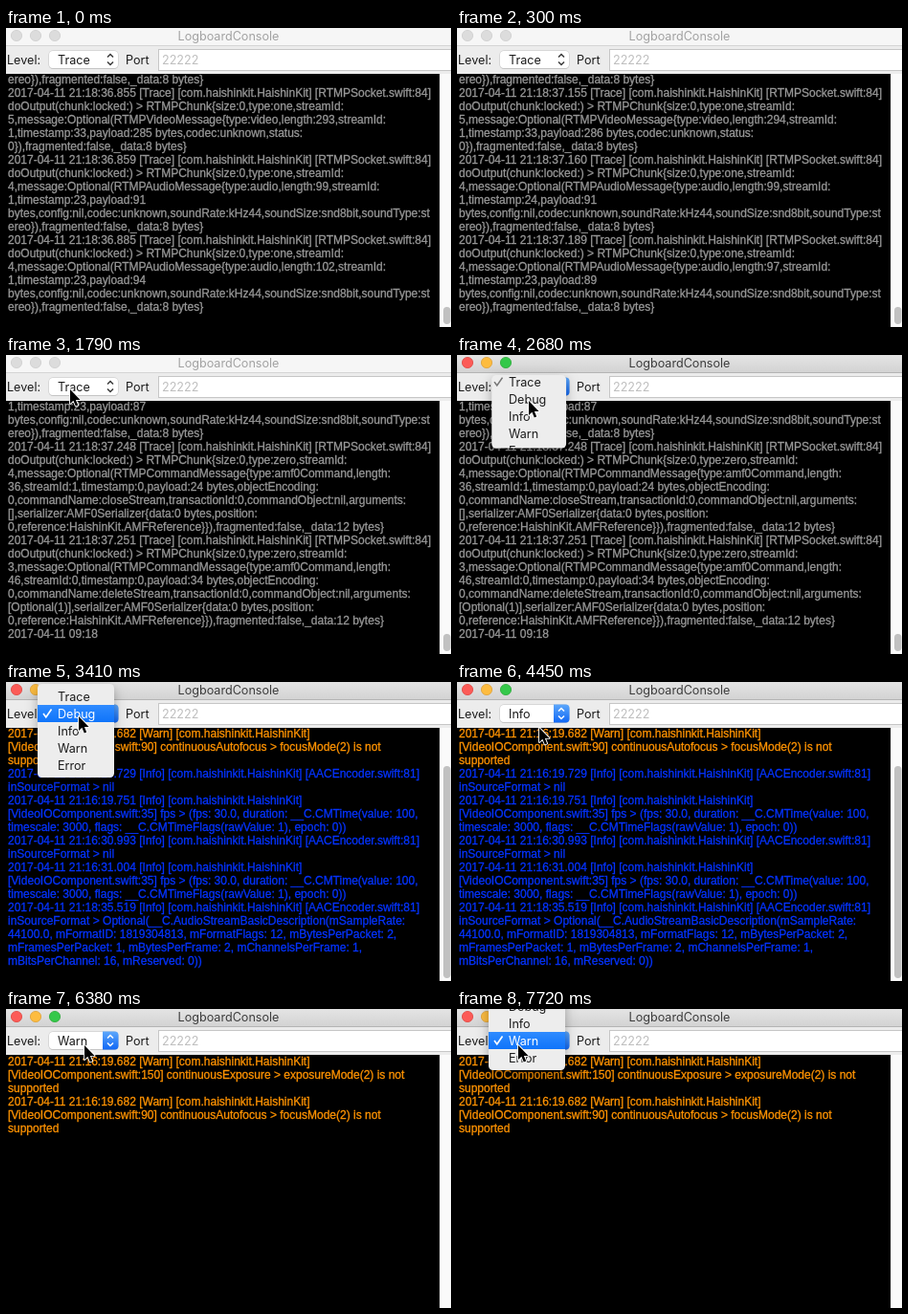
An HTML page with a canvas that plays this animation: 465 px wide and 313 px high, repeating every 8000 ms.

```html
<!DOCTYPE html>
<html lang="en">
<head>
<meta charset="utf-8">
<title>LogboardConsole</title>
<style>
  html, body { margin: 0; width: 100%; height: 100%; overflow: hidden; background: #000; }
  canvas { display: block; width: 465px; height: 313px; }
</style>
</head>
<body>
<canvas id="stage"></canvas>
<script>
const W = 465, H = 313, LOOP = 8000, TICK = 148.3;
const UI = '12.6px Inter, sans-serif';
const MONO = '12px "Liberation Sans", Arial, sans-serif';
const LEVELS = ['Trace', 'Debug', 'Info', 'Warn', 'Error'];
const ROW = 18, MID = 33;
const GRAY = '#989898', BLUE = '#0433ff', ORANGE = '#ff9300';

const canvas = document.getElementById('stage');
const ctx = canvas.getContext('2d');
const dpr = window.devicePixelRatio || 1;
canvas.width = W * dpr;
canvas.height = H * dpr;

// Log contents
const TAIL = 'ereo}),fragmented:false,_data:8 bytes}';
const head = (time, level, source) =>
  `2017-04-11 ${time} [${level}] [com.haishinkit.HaishinKit]` + (source ? ` [${source}]` : '');
const chunk = (time, type, id) => [
  head(time, 'Trace', 'RTMPSocket.swift:84'),
  `doOutput(chunk:locked:) > RTMPChunk{size:0,type:${type},streamId:`,
  id
];
const audioEnd = (stamp, payload) => [
  `1,timestamp:${stamp},payload:${payload}`,
  'bytes,config:nil,codec:unknown,soundRate:kHz44,soundSize:snd8bit,soundType:st',
  TAIL
];
const audio = (time, stamp, length) => [
  ...chunk(time, 'one', `4,message:Optional(RTMPAudioMessage{type:audio,length:${length},streamId:`),
  ...audioEnd(stamp, length - 8)
];
const video = (time, length) => [
  ...chunk(time, 'one', `5,message:Optional(RTMPVideoMessage{type:video,length:${length},streamId:`),
  `1,timestamp:33,payload:${length - 8} bytes,codec:unknown,status:`,
  '0}),fragmented:false,_data:8 bytes}'
];
const command = (time, id, length, stream, name, args) => [
  ...chunk(time, 'zero', `${id},message:Optional(RTMPCommandMessage{type:amf0Command,length:`),
  `${length},streamId:${stream},timestamp:0,payload:${length - 12} bytes,objectEncoding:`,
  `0,commandName:${name},transactionId:0,commandObject:nil,arguments:`,
  `[${args}],serializer:AMF0Serializer{data:0 bytes,position:`,
  '0,reference:HaishinKit.AMFReference}}),fragmented:false,_data:12 bytes}'
];
const warning = (line, what, mode) => [
  head('21:16:19.682', 'Warn'),
  `[VideoIOComponent.swift:${line}] ${what} > ${mode}(2) is not`,
  'supported'
];
const encoder = (time, format) => [
  head(time, 'Info', 'AACEncoder.swift:81'),
  'inSourceFormat > ' + format
];
const fps = time => [
  head(time, 'Info'),
  '[VideoIOComponent.swift:35] fps > (fps: 30.0, duration: __C.CMTime(value: 100,',
  'timescale: 3000, flags: __C.CMTimeFlags(rawValue: 1), epoch: 0))'
];
const paint = (color, lines) => lines.map(text => ({ text, color }));
const focus = warning(90, 'continuousAutofocus', 'focusMode');

const LOGS = {
  first: paint(GRAY, [TAIL, ...video('21:18:36.855', 293),
    ...audio('21:18:36.859', 23, 99), ...audio('21:18:36.885', 23, 102)]),
  second: paint(GRAY, [TAIL, ...video('21:18:37.155', 294),
    ...audio('21:18:37.160', 24, 99), ...audio('21:18:37.189', 23, 97)]),
  closing: paint(GRAY, [...audioEnd(23, 87),
    ...command('21:18:37.248', 4, 36, 1, 'closeStream', ''),
    ...command('21:18:37.251', 3, 46, 0, 'deleteStream', 'Optional(1)'),
    '2017-04-11 09:18']),
  info: [...paint(ORANGE, focus), ...paint(BLUE, [
    ...encoder('21:16:19.729', 'nil'), ...fps('21:16:19.751'),
    ...encoder('21:16:30.993', 'nil'), ...fps('21:16:31.004'),
    ...encoder('21:18:35.519', 'Optional(__C.AudioStreamBasicDescription(mSampleRate:'),
    '44100.0, mFormatID: 1819304813, mFormatFlags: 12, mBytesPerPacket: 2,',
    'mFramesPerPacket: 1, mBytesPerFrame: 2, mChannelsPerFrame: 1,',
    'mBitsPerChannel: 16, mReserved: 0))'])],
  warn: paint(ORANGE, [...warning(150, 'continuousExposure', 'exposureMode'), ...focus])
};

// State changes, by tick
const EVENTS = [
  [0, { log: 'first', level: 0, menu: false, hover: -1, close: 0, active: false, thumb: 292 }],
  [2, { log: 'second' }],
  [3, { log: 'closing' }],
  [13, { active: true, menu: true, hover: 0 }],
  [15, { hover: 1 }],
  [17, { hover: -1 }],
  [18, { close: 0.27, target: 1 }],
  [19, { menu: false, close: 0, level: 1, log: 'info', thumb: 88 }],
  [22, { menu: true, hover: 1 }],
  [26, { hover: 2 }],
  [30, { menu: false, level: 2 }],
  [34, { menu: true, hover: 2 }],
  [38, { hover: 3 }],
  [41, { hover: -1, close: 0.6, target: 3 }],
  [42, { menu: false, close: 0, level: 3, log: 'warn', thumb: 0 }],
  [45, { menu: true, hover: 3 }]
];
// Pointer waypoints: tick, x, y
const PATH = [
  [8, 96, 116], [12, 67, 36], [13, 67, 36], [15, 75, 48], [19, 75, 48], [22, 76, 36],
  [24, 76, 36], [26, 86, 48], [30, 86, 48], [32, 84, 37], [34, 84, 37], [39, 95, 47],
  [41, 95, 47], [43, 82, 38], [45, 82, 38], [50, 62, 36], [51, 62, 36], [52, 64, 38]
];

const lerp = (a, b, p) => a + (b - a) * p;

function stateAt(tick) {
  return Object.assign({}, ...EVENTS.filter(e => e[0] <= tick).map(e => e[1]));
}

function pointerAt(tick) {
  if (tick < PATH[0][0]) return null;
  const i = PATH.findIndex(p => p[0] > tick);
  if (i < 0) return PATH[PATH.length - 1].slice(1);
  const a = PATH[i - 1], b = PATH[i], p = (tick - a[0]) / (b[0] - a[0]);
  return [Math.round(lerp(a[1], b[1], p)), Math.round(lerp(a[2], b[2], p))];
}

function rect(x, y, w, h, fill) {
  ctx.fillStyle = fill;
  ctx.fillRect(x, y, w, h);
}

function round(x, y, w, h, r, fill) {
  ctx.beginPath();
  ctx.roundRect(x, y, w, h, r);
  ctx.fillStyle = fill;
  ctx.fill();
}

function line(points, color, width) {
  ctx.beginPath();
  points.forEach(([x, y]) => ctx.lineTo(x, y));
  ctx.strokeStyle = color;
  ctx.lineWidth = width;
  ctx.stroke();
}

function label(text, x, y, color, align = 'left') {
  ctx.font = UI;
  ctx.textAlign = align;
  ctx.fillStyle = color;
  ctx.fillText(text, x, y);
}

function vertical(y0, y1, top, bottom) {
  const g = ctx.createLinearGradient(0, y0, 0, y1);
  g.addColorStop(0, top);
  g.addColorStop(1, bottom);
  return g;
}

function drawTitle(active) {
  rect(0, 0, W, 18, active ? vertical(0, 18, '#e4e4e4', '#d3d3d3') : '#f6f6f6');
  rect(0, 18, W, 1, active ? '#b4b4b4' : '#d4d4d4');
  const lights = active
    ? [['#fc5b57', '#e0443e'], ['#fdbc40', '#dea034'], ['#34c84a', '#27aa35']]
    : Array(3).fill(['#dcdcdc', '#cdcdcd']);
  lights.forEach(([fill, edge], i) => {
    ctx.beginPath();
    ctx.arc(11 + 20 * i, 8, 5.6, 0, Math.PI * 2);
    ctx.fillStyle = fill;
    ctx.fill();
    ctx.strokeStyle = edge;
    ctx.lineWidth = 0.8;
    ctx.stroke();
  });
  label('LogboardConsole', 232.5, 13, active ? '#3c3c3c' : '#a2a2a2', 'center');
}

function drawToolbar(s) {
  rect(0, 19, W, 29, '#ececec');
  label('Level:', 1, 38, '#1a1a1a');
  label('Port', 125, 38, '#1a1a1a');
  rect(159, 22, 310, 23, '#c6c6c6');
  rect(160, 23, 310, 21, '#fff');
  label('22222', 163, 38, '#bfbfbf');

  round(44.5, 23.5, 73, 19.5, 4.5, '#c4c4c4');
  round(45, 24, 72, 18, 4, '#fff');
  if (s.active) round(101, 23.5, 16.5, 19, [0, 4, 4, 0], vertical(23, 42, '#5fa9fb', '#1269f5'));
  const ink = s.active ? '#fff' : '#3a3a3a';
  line([[106, 30.5], [109, 27.5], [112, 30.5]], ink, 1.5);
  line([[106, 35.5], [109, 38.5], [112, 35.5]], ink, 1.5);
  label(LEVELS[s.level], 54, 38, '#1a1a1a');
}

function drawLog(s) {
  rect(0, 48, 453, H - 48, '#000');
  rect(453, 48, 12, H - 48, '#fafafa');
  rect(453, 48, 1, H - 48, '#e8e8e8');
  if (s.thumb) round(457, s.thumb, 7.5, 310 - s.thumb, 3.7, '#c1c1c1');
  ctx.font = MONO;
  ctx.textAlign = 'left';
  ctx.lineWidth = 0.3;
  const base = s.log === 'warn' ? 59 : 58;
  LOGS[s.log].forEach(({ text, color }, i) => {
    ctx.fillStyle = ctx.strokeStyle = color;
    ctx.fillText(text, 2, base + 14 * i);
    ctx.strokeText(text, 2, base + 14 * i);
  });
}

// While closing, the list shrinks into the button around the chosen row.
function drawMenu(s) {
  const p = s.close;
  const first = MID - ROW * s.level;
  const shift = p ? (s.target - s.level) * ROW * p : 0;
  const left = lerp(33, 45, p), right = lerp(113, 117, p);
  const top = lerp(first - 13, 24, p);
  const bottom = lerp(first + 4 * ROW + 13, 42, p);
  const w = right - left, h = bottom - top;

  ctx.save();
  ctx.shadowColor = 'rgba(0,0,0,.3)';
  ctx.shadowBlur = 12 * dpr;
  ctx.shadowOffsetY = 4 * dpr;
  round(left, top, w, h, 4.5, '#ededed');
  ctx.restore();

  ctx.save();
  ctx.beginPath();
  ctx.roundRect(left, top, w, h, 4.5);
  ctx.clip();
  LEVELS.forEach((name, i) => {
    const y = first + ROW * i - shift;
    const lit = i === s.hover;
    if (lit) rect(left, y - 9, w, ROW, vertical(y - 9, y + 9, '#2f8bff', '#0f74fa'));
    const ink = lit ? '#fff' : '#1c1c1c';
    label(name, 54, y + 4.5, ink);
    if (i === s.level) line([[39, y], [41.8, y + 3.8], [47.5, y - 4.5]], p ? '#777' : ink, 1.6);
  });
  ctx.restore();
}

function drawPointer([x, y]) {
  ctx.save();
  ctx.translate(x, y);
  ctx.beginPath();
  [[0, 0], [0, 15], [3.4, 11.8], [5.8, 17.4], [8.2, 16.4], [5.9, 10.9], [10.6, 10.9]]
    .forEach(([px, py]) => ctx.lineTo(px, py));
  ctx.closePath();
  ctx.lineJoin = 'round';
  ctx.lineWidth = 1.8;
  ctx.strokeStyle = '#fff';
  ctx.stroke();
  ctx.fillStyle = '#000';
  ctx.fill();
  ctx.restore();
}

function draw(now) {
  const tick = Math.floor(((now % LOOP) + 12) / TICK);
  const s = stateAt(tick);
  const pointer = pointerAt(tick);
  ctx.setTransform(dpr, 0, 0, dpr, 0, 0);
  drawLog(s);
  drawTitle(s.active);
  drawToolbar(s);
  if (s.menu) drawMenu(s);
  if (pointer) drawPointer(pointer);
}

const start = performance.now();
function loop() {
  draw(performance.now() - start);
  requestAnimationFrame(loop);
}
loop();
</script>
</body>
</html>
```
